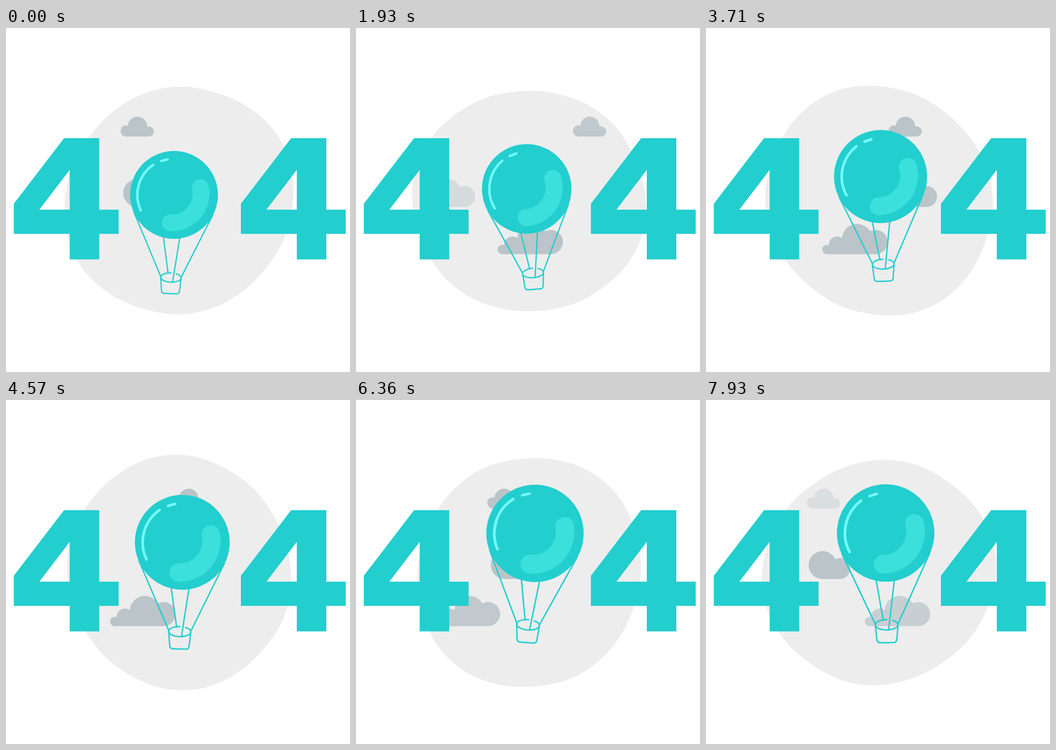
Recreate the animation shown at these times as an HTML page. Size 640 px wide and 640 px high, loop 8 s.

```html
<!DOCTYPE html>
<html lang="en">
<head>
<meta charset="utf-8">
<title>404</title>
<style>
  html, body { margin: 0; width: 100%; height: 100%; overflow: hidden; background: #fff; }
  svg { display: block; width: 100%; height: 100%; }
</style>
</head>
<body>
<svg viewBox="0 0 640 640" role="img" aria-label="404">
  <defs>
    <path id="four" fill-rule="evenodd" d="M108 205H173.5V338H209.5V383H173.5V430.5H118.5V383H14.5V327Z M118.5 264L62 338H118.5Z"/>
  </defs>
  <path id="blob" fill="#ededed"/>
  <g fill="#bac4c9">
    <g class="cloud">
      <circle cy="183" r="18"/>
      <circle cx="-21" cy="191.5" r="10.5"/>
      <circle cx="21" cy="192.5" r="9.5"/>
      <path d="M-21 190H21V202H-21Z"/>
    </g>
    <g class="cloud">
      <circle cy="307" r="26"/>
      <circle cx="32" cy="313.5" r="19.5"/>
      <path d="M0 307H32V333H0Z"/>
    </g>
    <g class="cloud">
      <circle cx="-57" cy="392.5" r="28"/>
      <circle cx="-22.5" cy="398.2" r="22.5"/>
      <circle cx="-94" cy="403.5" r="15.5"/>
      <circle cx="-113" cy="412" r="8.8"/>
      <path d="M-113 412H-94V398H-22V420.7H-113Z"/>
    </g>
  </g>
  <g fill="#23cece">
    <use href="#four"/>
    <use href="#four" x="422.5"/>
  </g>
  <g id="balloon" fill="none" stroke-linecap="round" stroke-linejoin="round">
    <g stroke="#23cece" stroke-width="2.6">
      <path d="M-81 38L-21 168M81 38L21 168M-18.4 88L-6.2 161M15 88L3.5 179"/>
      <path d="M11 161.4A21 9.5 0 1 1 0 160"/>
      <path d="M-21 169.5L-18.5 196Q-18 202.5 -12 202.5H12.5Q18 202.5 18.5 196L21 169.5"/>
    </g>
    <circle r="90" fill="#23cece"/>
    <path d="M53.5 -17A60 60 0 0 1 -5.5 57.5" stroke="#3bdfdb" stroke-width="34.5"/>
    <path d="M-44.9 -60A75 75 0 0 0 -66.9 34.4M-28.8 -68.5L-15.7 -72.5" stroke="#72fbfa" stroke-width="5"/>
  </g>
</svg>
<script>
const LOOP = 8000;
const CYCLE = 7220;
const FADE = 1000;
const RISE = 7280;

// Radii of half the blob, every 18 degrees; the other half repeats them.
const RADII = [212, 212, 216, 219.5, 218, 212, 208.5, 205, 206, 209.5];

// Start time, start x and speed in px per ms.
const DRIFT = [
  { start: 1070, x: 466, v: 0.036 },
  { start: 2390, x: 429, v: 0.0383 },
  { start: 0, x: 436, v: 0.0264 }
];

const blob = document.getElementById('blob');
const balloon = document.getElementById('balloon');
const clouds = [...document.querySelectorAll('.cloud')];
const mod = (a, n) => ((a % n) + n) % n;

function blobPath() {
  const n = RADII.length * 2;
  const pts = Array.from({ length: n }, (_, i) => {
    const a = (i * 18 - 90) * Math.PI / 180;
    const r = RADII[i % RADII.length];
    return [r * Math.cos(a), r * Math.sin(a)];
  });
  const at = i => pts[mod(i, n)];
  const handle = (p, a, b, s) => p.map((c, k) => (c + s * (b[k] - a[k]) / 6).toFixed(2));
  let d = 'M' + at(0);
  for (let i = 0; i < n; i++) {
    const c1 = handle(at(i), at(i - 1), at(i + 1), 1);
    const c2 = handle(at(i + 1), at(i), at(i + 2), -1);
    d += `C${c1} ${c2} ${at(i + 1)}`;
  }
  return d + 'Z';
}

function draw(t) {
  const dip = 2.5 * Math.exp(-(((t - 2600) / 700) ** 2));
  blob.setAttribute('transform', `translate(322 ${321 + dip}) rotate(${180 * t / CYCLE})`);

  clouds.forEach((el, i) => {
    const { start, x, v } = DRIFT[i];
    const u = mod(t - start, CYCLE);
    el.setAttribute('transform', `translate(${x - v * u} 0)`);
    el.setAttribute('opacity', Math.min(1, u / FADE, (CYCLE - u) / FADE));
  });

  const c = Math.cos(Math.PI * (t + 60) / RISE);
  const sway = 4.6 * Math.sin(2 * Math.PI * (t - 550) / CYCLE);
  const x = 323.8 - 10.8 * c + 0.2 * sway;
  const y = 278.2 + 32.3 * c;
  const size = (86.3 - 4.6 * c) / 90;
  balloon.setAttribute('transform', `translate(${x} ${y}) rotate(${-sway}) scale(${size})`);
}

blob.setAttribute('d', blobPath());
const begin = performance.now();
function tick() {
  draw((performance.now() - begin) % LOOP);
  requestAnimationFrame(tick);
}
tick();
</script>
</body>
</html>
```
